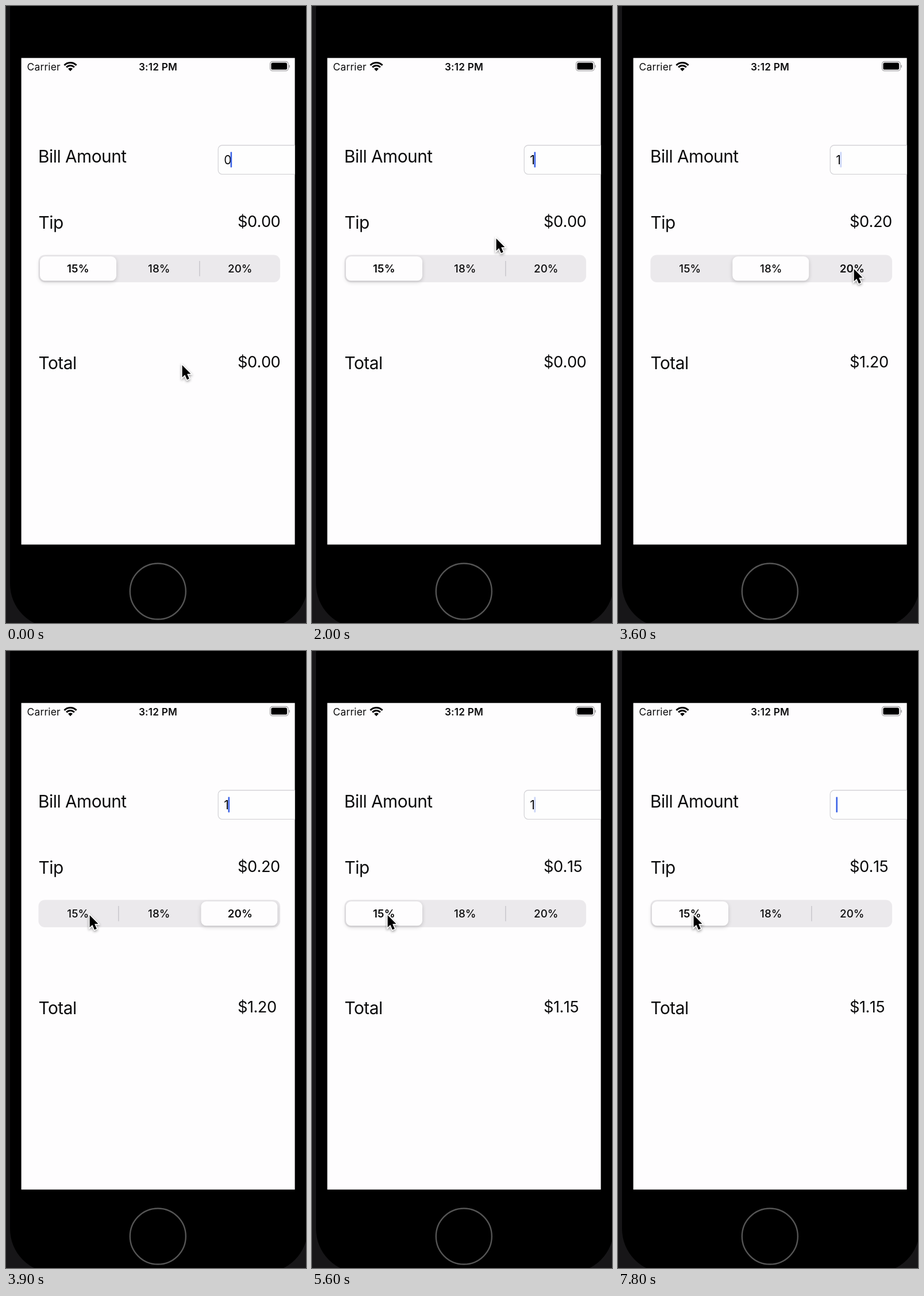
These frames come from a looping animation (522 by 1072 pixels, 8 s). An HTML page with a canvas:

```html
<!DOCTYPE html>
<html lang="en">
<head>
<meta charset="utf-8">
<title>Tip calculator</title>
<style>
html, body { margin: 0; width: 100%; height: 100%; overflow: hidden; background: #000; }
canvas { display: block; width: 522px; height: 1072px; }
</style>
</head>
<body>
<canvas id="stage" width="522" height="1072"></canvas>
<script>
const ctx = document.getElementById('stage').getContext('2d');
const LOOP = 8000, STEP = 100;
const FONT = 'Inter, Roboto, sans-serif';
const INK = '#0b0b0c', PAPER = '#fefdfe';
const SCREEN = [26.6, 90.3, 476, 845.4];
const RATES = [15, 18, 20];

const HOME = { x: 306, y: 623 };
const MOVES = [
  { from: 0, to: 500, x: 498, y: 300 },
  { from: 1600, to: 2000, x: 320, y: 403 },
  { from: 2000, to: 2600, x: 271, y: 449 },
  { from: 2900, to: 3400, x: 410, y: 456 },
  { from: 3600, to: 3900, x: 145, y: 458 },
  { from: 3900, to: 4400, x: 101, y: 462 },
  { from: 4600, to: 5000, x: 131, y: 458 }
];

const TAPS = [{ at: 2765, pick: 1 }, { at: 3600, pick: 2 }, { at: 4400, pick: 0 }];
const SLIDE_DELAY = 30, SLIDE_TIME = 280;

const clamp = v => Math.max(0, Math.min(1, v));
const lerp = (a, b, k) => a + (b - a) * k;
const progress = (t, from, to) => clamp((t - from) / (to - from));
const easeOut = u => 1 - (1 - u) ** 3;
const smooth = u => u * u * (3 - 2 * u);

function box(x, y, w, h, r, fill, stroke, line = 1) {
  ctx.beginPath();
  ctx.roundRect(x, y, w, h, r);
  if (fill) { ctx.fillStyle = fill; ctx.fill(); }
  if (stroke) { ctx.strokeStyle = stroke; ctx.lineWidth = line; ctx.stroke(); }
}

function text(str, x, y, size, { weight = 400, align = 'left', gap = 0, kern = 'normal' } = {}) {
  ctx.font = `${weight} ${size}px ${FONT}`;
  ctx.letterSpacing = gap + 'px';
  ctx.fontKerning = kern;
  ctx.textAlign = align;
  ctx.fillStyle = INK;
  ctx.fillText(str, x, y);
}

function shadow(color, blur, y) {
  ctx.shadowColor = color;
  ctx.shadowBlur = blur;
  ctx.shadowOffsetY = y;
}

function pointerAt(t) {
  let { x, y } = HOME;
  for (const m of MOVES) {
    const k = smooth(progress(t, m.from, m.to));
    x = lerp(x, m.x, k);
    y = lerp(y, m.y, k);
  }
  return [x, y];
}

function entryAt(t) {
  if (t < 1200) return '0';
  return t >= 1800 && t < 6900 ? '1' : '';
}

// the caret stays solid while typing, then blinks once a second
function caretAlpha(t) {
  if (t >= 1200 && t < 2200) return 1;
  const phase = (t < 1200 ? t + 900 : t) % 1000;
  return phase < 500 ? 1 - progress(phase, 200, 400) : progress(phase, 530, 780);
}

function drawPhone() {
  ctx.fillStyle = '#171618';
  ctx.fillRect(0, 0, 522, 1072);
  box(7, -70, 518, 1150, 76, '#000');
  ctx.beginPath();
  ctx.arc(264.3, 1017, 48.5, 0, 7);
  ctx.strokeStyle = '#555';
  ctx.lineWidth = 2.4;
  ctx.stroke();
  ctx.fillStyle = PAPER;
  ctx.fillRect(...SCREEN);
}

function drawStatus() {
  text('Carrier', 36.5, 111.5, 17.5, { gap: 0.15 });
  text('3:12 PM', 264.5, 111.5, 17.2, { weight: 600, align: 'center', gap: 0.2 });
  ctx.strokeStyle = ctx.fillStyle = '#000';
  ctx.lineWidth = 3;
  const left = -Math.PI * 0.76, right = -Math.PI * 0.24;
  for (const r of [14.4, 9.3]) {
    ctx.beginPath();
    ctx.arc(112, 112.8, r, left, right);
    ctx.stroke();
  }
  ctx.beginPath();
  ctx.moveTo(112, 113.2);
  ctx.arc(112, 112.8, 5.4, left, right);
  ctx.fill();
  box(459.5, 96.5, 31.6, 16.2, 4.2, null, '#a5a4a6', 1.3);
  box(461.4, 98.6, 27.6, 12, 2.6, '#000');
  box(492.3, 102.2, 1.7, 5, 1, '#a5a4a6');
}

function drawField(t) {
  const entry = entryAt(t);
  ctx.save();
  ctx.beginPath();
  ctx.rect(...SCREEN);
  ctx.clip();
  box(369.2, 242, 160, 50.3, 7, '#fefefe', '#d5d4d8', 1.3);
  ctx.restore();
  text(entry, 379.2, 275, 21, { gap: -0.3 });
  ctx.globalAlpha = caretAlpha(t);
  box(379.4 + ctx.measureText(entry).width * 0.86, 253.4, 2.6, 27, 1, '#3c63e6');
  ctx.globalAlpha = 1;
}

function drawSegments(t, selected) {
  let thumb = 0;
  for (const { at, pick } of TAPS) {
    const start = at + SLIDE_DELAY;
    thumb = lerp(thumb, pick, easeOut(progress(t, start, start + SLIDE_TIME)));
  }
  box(56.5, 432.5, 420.5, 47.5, 11, '#ebe9ec');
  // a divider fades as the thumb nears either of its segments
  for (const i of [0, 1]) {
    const away = Math.abs(thumb - i - 0.5) - 0.5;
    ctx.fillStyle = `rgba(195,193,198,${clamp(away)})`;
    ctx.fillRect(195.2 + i * 141, 443, 1.3, 26.5);
  }
  ctx.save();
  shadow('rgba(0,0,0,.18)', 7, 2.5);
  box(59 + thumb * 140.2, 435, 133, 42.3, 9, PAPER);
  ctx.restore();
  RATES.forEach((rate, i) => text(rate + '%', 125.3 + i * 141, 463, 18.8,
    { weight: i === selected ? 600 : 500, align: 'center', gap: 0.1 }));
}

function drawPointer(x, y) {
  ctx.save();
  ctx.translate(x + 0.6, y + 1);
  const arrow = new Path2D('M0 0V21.2L4.7 16.8 8.4 25.2 12.2 23.5 8.5 15.3 14.8 15Z');
  ctx.lineWidth = 3.2;
  ctx.strokeStyle = '#fff';
  shadow('rgba(0,0,0,.4)', 4, 2);
  ctx.stroke(arrow);
  ctx.shadowColor = 'transparent';
  ctx.fillStyle = '#000';
  ctx.fill(arrow);
  ctx.restore();
}

function draw(t) {
  const tap = TAPS.filter(p => t >= p.at).pop();
  const selected = tap ? tap.pick : 0;
  const tip = tap ? RATES[selected] / 100 : 0;
  const total = tap ? 1 + tip : 0;
  const label = { gap: -0.5 }, value = { gap: -0.5, kern: 'none' };

  drawPhone();
  drawStatus();
  text('Bill Amount', 56, 272.4, 29.8, label);
  text('Tip', 56.5, 387.4, 29.8, label);
  text('Total', 56.5, 631.4, 29.8, label);
  text('$' + tip.toFixed(2), 403, 383.6, 27.2, value);
  text('$' + total.toFixed(2), 403, 627.6, 27.2, value);
  drawField(t);
  drawSegments(t, selected);
  drawPointer(...pointerAt(t));
}

function tick() {
  const t = performance.now() % LOOP;
  draw(Math.floor(t / STEP) * STEP);
  requestAnimationFrame(tick);
}
tick();
</script>
</body>
</html>
```
